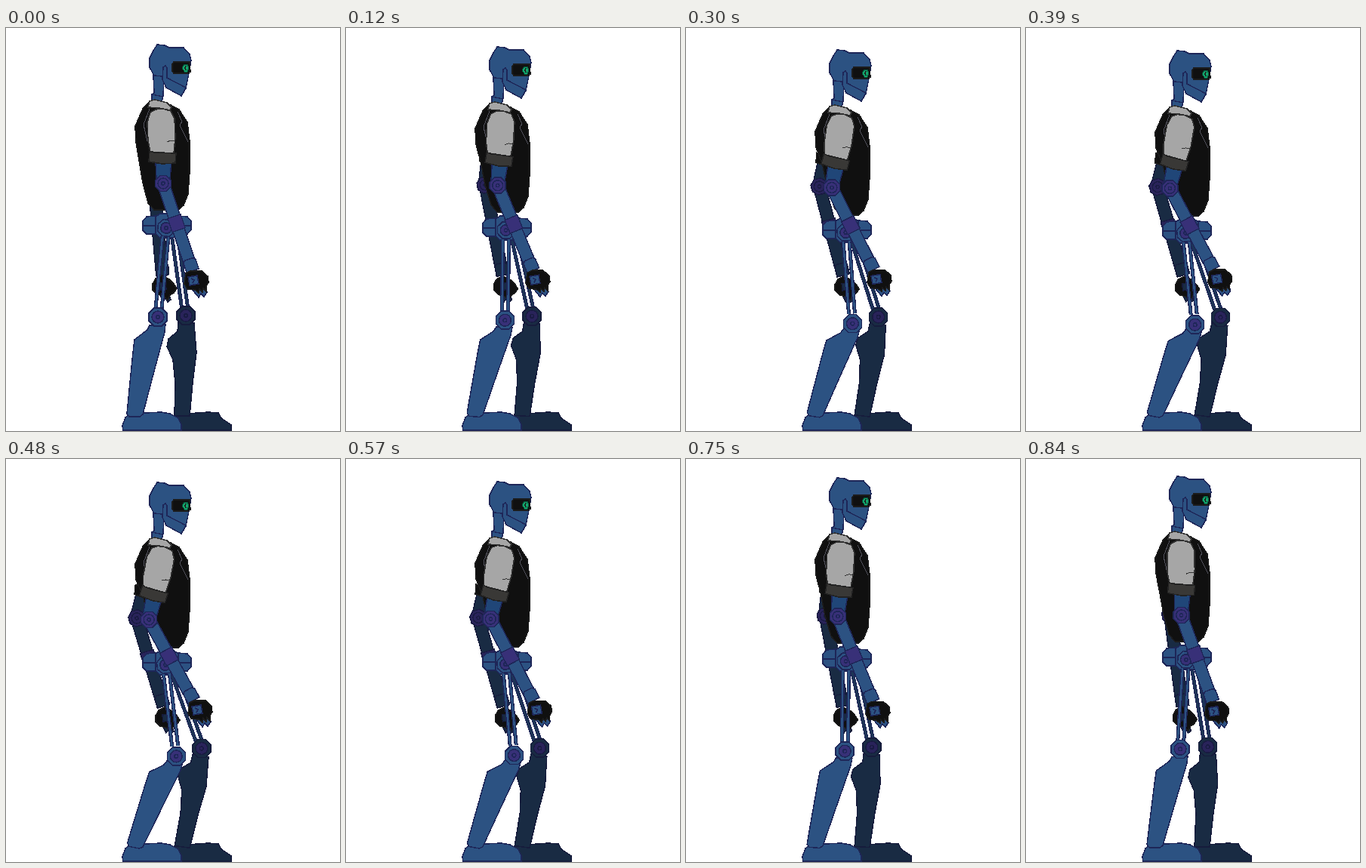
These frames come from a looping animation (442x534 px, 900 ms). An HTML page:

```html
<!DOCTYPE html>
<html lang="en">
<head>
<meta charset="utf-8">
<title>Idle robot</title>
<style>
  html, body { margin: 0; width: 100%; height: 100%; overflow: hidden; background: #fff; }
  svg { display: block; width: 442px; height: 534px; shape-rendering: crispEdges; }
  path, circle { stroke: #1e2658; stroke-width: 1.5; fill: none; }
  .blue { fill: #2c5282; }
  .upper { fill: #204678; }
  .dark { fill: #192b43; stroke: #161c3c; }
  .purple { fill: #383078; }
  .dusk { fill: #29235a; stroke: #191b42; }
  .black { fill: #101010; stroke: #1c1c1c; }
  .grey { fill: #a6a6a6; stroke: #303030; }
  .cuff { fill: #393836; stroke: #222; }
  .seam { stroke: #50505a; stroke-width: 1; }
  .crease { stroke: #333; stroke-width: 1; }
  .green { fill: #12a56b; stroke: #075038; stroke-width: 1; }
  .rail { stroke-width: 5; }
  .core { stroke: #2c5282; stroke-width: 2.4; }
  .darkcore { stroke: #1d3656; stroke-width: 2.4; }
</style>
</head>
<body>
<svg id="stage" viewBox="0 0 442 534"></svg>
<script>
const stage = document.getElementById('stage');
const shape = (cls, d) => `<path class="${cls}" d="${d}"/>`;
const group = (id, ...parts) => `<g id="${id}">${parts.join('')}</g>`;
const disc = (cls, x, y, r) => `<circle class="${cls}" cx="${x}" cy="${y}" r="${r}"/>`;

// Octagonal joint with a round hub
function joint(y, r, ring, hub) {
  const c = r * 0.42;
  return shape(ring, `M${-c} ${y - r}H${c}L${r} ${y - c}V${y + c}L${c} ${y + r}H${-c}L${-r} ${y + c}V${y - c}Z`)
    + disc(hub, 0, y, r * 0.66) + disc(hub, 0, y, r * 0.2);
}

// Limbs hang straight down from their own origin
const rails = core => [-4, 4].map(x =>
  shape('rail', `M${x} 12V108`) + shape(core, `M${x} 12V108`)).join('');

const forearm = (tone, band) =>
  shape(tone, 'M-8 8H8V112H-8Z')
  + shape(band, 'M-9 46H9V65H-9Z')
  + shape(tone, 'M-8 109L-5 106H6L9 109V122H-8Z');

stage.innerHTML = [
  group('rearUpper', shape('dark', 'M-9 20H9V84H-9Z'), shape('black', 'M-13 40L13 42L12 55L-11 53Z')),
  group('rearFore', forearm('dark', 'dusk'), joint(0, 10.5, 'dusk', 'dusk')),
  group('rearHand',
    shape('dark', 'M203 352L215 351L218 360L214 363L211 358L208 362Z'),
    shape('black', 'M198 332L206 328L216 333L222 339L226 345L222 351L217 354L214 360L208 355L200 353L194 347L194 339Z'),
    shape('dark', 'M203 338L211 337L212 346L204 347Z')),
  group('rearThigh', rails('darkcore')),
  shape('dark', 'M222 514L240 511L268 509L281 510L285 517L298 526V533H230Z'),
  group('rearShin', shape('dark',
    'M228 390L249 391L250 405L252 430L247 470L243 514L223 514L224 470L221 440L213 422L215 412L227 402Z')),
  group('rearKnee', joint(0, 12, 'dark', 'dusk')),
  group('pelvis',
    shape('blue', 'M198 250L204 246H222L228 250V274L221 278H204L198 273Z'),
    shape('blue', 'M186 250L198 249V273H186L181 268V256Z'),
    shape('blue', 'M228 249L240 250L245 256V267L240 273H228Z'),
    shape('', 'M181 262H198M228 262H245')),
  group('torso',
    shape('blue', 'M195 62H209L208 90L206 98L193 96V88L196 86Z'),
    shape('', 'M194 88L207 91'),
    '<path id="vest" class="black"/>',
    shape('seam', 'M227 111L233 124L230 129L241 151'),
    shape('seam', 'M190 107L182 128L187 150'),
    shape('grey', 'M190 97L197 95L213 99L219 105L217 109L203 106L188 105Z'),
    shape('blue', 'M200 22L210 23L216 26H235L243 35L245 43L242 60L238 80L232 90L214 80L207 64L196 63L190 52V40L195 30Z'),
    shape('blue', 'M208 52L211 50L213 53V66L238 79L232 90L212 79L207 68Z'),
    shape('black', 'M222 45H243L244 58L241 60H222L220 57V48Z'),
    shape('green', 'M236 48L240 48L242 53L240 58H236L233 53Z'),
    shape('black', 'M238 50L237 53L238 56')),
  shape('blue', 'M155 533L154 527L158 516L165 511L205 509L217 511L228 517L232 526V533Z'),
  group('thigh', rails('core'), joint(0, 11, 'blue', 'purple')),
  group('shin', shape('blue',
    'M190 394L211 393L210 403L200 440L192 470L181 512L177 515H163L160 511L163 480L168 430L170 413L187 400Z')),
  group('knee', joint(0, 12, 'blue', 'purple')),
  group('fore', forearm('blue', 'purple')),
  group('upper',
    shape('upper', 'M198 176H219L217 200H199Z'),
    shape('grey', 'M191 112L198 108L207 107L218 110L223 120L224 145L222 166L191 164L188 150L187 125Z'),
    shape('crease', 'M213 151L218 149L224 149'),
    shape('cuff', 'M190 163L196 165L225 166L224 179L207 180L189 177Z')),
  group('elbow', joint(0, 10.5, 'purple', 'purple')),
  group('hand',
    shape('blue', 'M246 346L263 341L266 350L262 356L258 352L255 357L250 351Z'),
    shape('black', 'M238 325L244 322L259 322L267 329L268 337L265 342V349L261 345L260 350L256 346L255 351L250 347L240 346L236 339Z'),
    shape('blue', 'M241 330L253 328L255 339L243 341Z'),
    shape('', 'M245 332L249 334L247 338'))
].join('');

const el = Object.fromEntries([...stage.querySelectorAll('[id]')].map(n => [n.id, n]));
const put = (id, transform) => el[id].setAttribute('transform', transform);
const move = (id, x, y) => put(id, `translate(${x} ${y})`);

function limb(id, [x, y], [endX, endY]) {
  const angle = -Math.atan2(endX - x, endY - y) * 180 / Math.PI;
  put(id, `translate(${x} ${y}) rotate(${angle})`);
}

// q runs from 0 (standing tall) to 1 (knees bent)
function pose(q) {
  const drop = Math.round(9.3 * q ** 1.15);
  const sink = Math.round(8 * q);
  const knee = [201 + 24.5 * q, 383 + 11 * q];
  const rearKnee = [238 + 21 * q, 381 + 2.5 * q];
  const elbow = [208 - 19 * q, 206 + 7 * q];
  const rearElbow = [196 - 23 * q ** 0.7, 206 + 5 * q];

  move('torso', 0, drop);
  move('pelvis', 0, sink);
  el.vest.setAttribute('d', `M190 97L181 107L171 130L172 151L${176 + 6 * q} 175L${181 + 8 * q} 205
    L${188 + 11 * q} 232L${196 + 12 * q} 241H228L235 235L241 220L243 190V150L240 125L229 108L218 102Z`);

  limb('rearUpper', [194, 122 + drop], rearElbow);
  limb('rearFore', rearElbow, [207 + 2 * q, 330 + q]);
  move('rearHand', 4 * q, q);
  put('upper', `translate(0 ${drop}) rotate(${13 * q} 206 120)`);
  limb('fore', elbow, [246 + q, 320 - 2 * q]);
  move('elbow', ...elbow);
  move('hand', 5 * q, -2 * q);

  limb('thigh', [212 - q, 265 + sink], knee);
  limb('rearThigh', [222 - 3 * q, 265 + sink], rearKnee);
  put('shin', `rotate(${11.4 * q} 171 513)`);
  put('rearShin', `rotate(${9 * q} 234 515)`);
  move('knee', ...knee);
  move('rearKnee', ...rearKnee);
}

// Twenty held steps per loop, alternately 30 and 60 ms long
function draw(now) {
  const t = now % 900;
  const step = 2 * Math.floor(t / 90) + (t % 90 >= 30 ? 1 : 0);
  pose(step < 12 ? Math.sin(step / 12 * Math.PI / 2) : (20 - step) / 8);
  requestAnimationFrame(draw);
}
draw(0);
</script>
</body>
</html>
```
